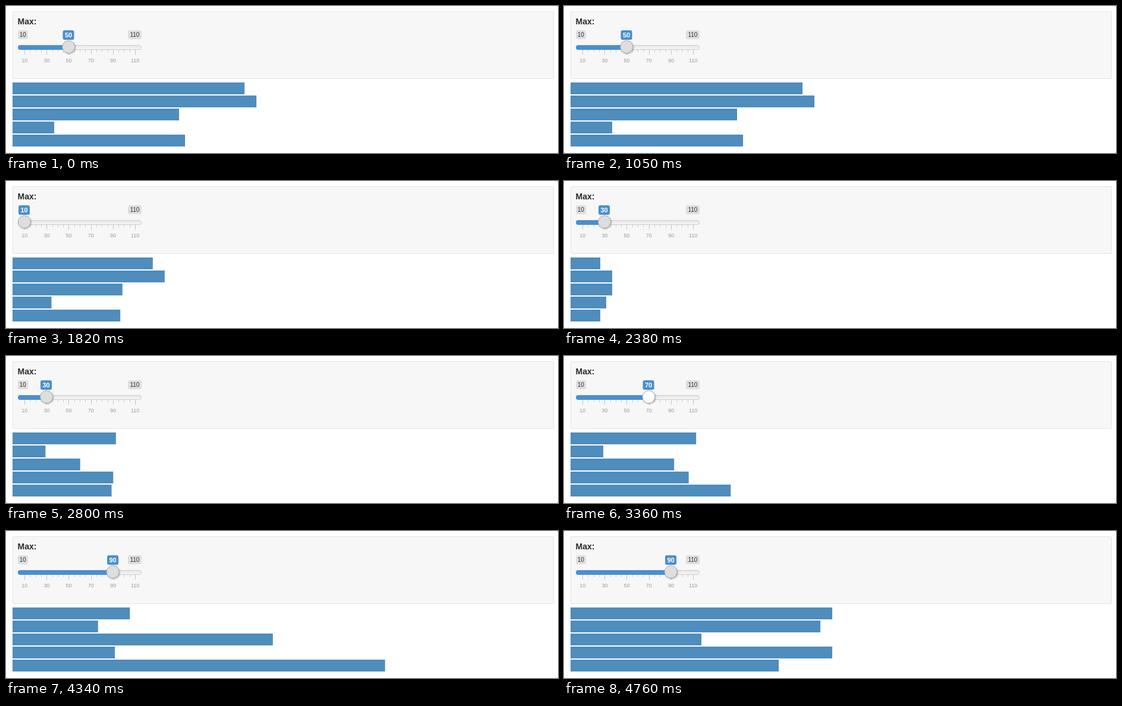
An HTML page for the animation above (5.25 s loop, 928 px wide and 248 px high).

```html
<!DOCTYPE html>
<html lang="en">
<head>
<meta charset="utf-8">
<title>Slider and bars</title>
<style>
  html, body { margin: 0; width: 100%; height: 100%; overflow: hidden; background: #aaa; }
  svg { display: block; width: 928px; height: 248px; font-family: "Liberation Sans", Arial, sans-serif; }
  .mid { text-anchor: middle; }
</style>
</head>
<body>
<svg id="stage" viewBox="0 0 928 248">
  <defs>
    <linearGradient id="groove" x1="0" y1="-0.5" x2="0" y2="1.5">
      <stop offset="0" stop-color="#dedede"/>
      <stop offset="1" stop-color="#fff"/>
    </linearGradient>
    <filter id="shadow" x="-30%" y="-30%" width="160%" height="160%">
      <feDropShadow dx="1" dy="1" stdDeviation="1.3" flood-opacity="0.3"/>
    </filter>
  </defs>
  <rect width="928" height="248" rx="2" fill="#fff"/>
  <rect x="11.5" y="9.5" width="909" height="113" rx="1.5" fill="#f7f7f7" stroke="#e3e3e3"/>
  <text x="19.6" y="31" font-size="14" font-weight="bold" fill="#2b2b2b">Max:</text>
  <g id="grid"></g>
  <rect x="20.5" y="66.5" width="207" height="7" rx="3.5" fill="url(#groove)" stroke="#ccc"/>
  <path id="fill" fill="#4a8fcf"/>
  <g font-size="10" fill="#333" class="mid">
    <g id="min"><rect x="20" y="41" width="17" height="15" rx="3" fill="#dfdfdf"/><text x="28.3" y="52">10</text></g>
    <rect x="205" y="41" width="23" height="15" rx="3" fill="#dfdfdf"/><text x="216.4" y="52">110</text>
  </g>
  <g id="bubble" class="mid">
    <rect x="-9.5" y="41" width="19" height="16" rx="3" fill="#4a8fcc"/>
    <text id="value" y="53" font-size="11" font-weight="bold" fill="#fff"></text>
  </g>
  <circle id="handle" cy="69" r="10.5" stroke="#aaa" filter="url(#shadow)"/>
  <g id="bars" fill="#4f8dbd"></g>
</svg>
<script>
const LOOP = 5250, STEP = 70, EASE_MS = 250;
const $ = id => document.getElementById(id);

// [time, slider value]
const moves = [[0, 50], [1470, 10], [2380, 30], [3010, 70], [3990, 90]];
// spans where the handle is highlighted
const hovers = [[1470, 1680], [2450, 2520], [3080, 3500], [3990, 4060]];
// [transition start, bar values]
const data = [
  [-EASE_MS, [39, 41, 28, 7, 29]],
  [1699, [5, 7, 7, 6, 5]],
  [2652, [22, 5, 13, 21, 21]],
  [3281, [15, 9, 48, 12, 68]],
  [4254, [44, 42, 22, 44, 35]]
];

const xOf = v => 31 + (v - 10) * 1.86;
const cubic = p => p < 0.5 ? 4 * p ** 3 : 1 - 4 * (1 - p) ** 3;
const clamp = p => Math.min(1, Math.max(0, p));

function add(parent, tag, attrs, text = "") {
  const el = document.createElementNS("http://www.w3.org/2000/svg", tag);
  for (const k in attrs) el.setAttribute(k, attrs[k]);
  el.textContent = text;
  return parent.appendChild(el);
}

for (let v = 10; v <= 110; v += 5) {
  const big = v % 20 === 10, x = Math.round(xOf(v));
  add($("grid"), "rect", { x, y: 74, width: 1, height: big ? 8 : 4, fill: big ? "#c2c4c6" : "#cccecf" });
  if (big) add($("grid"), "text", { x: xOf(v) + 0.2, y: 95, "font-size": 9, fill: "#999", class: "mid" }, v);
}
$("min").parentNode.setAttribute("text-anchor", "middle");

const bars = data[0][1].map((_, i) => add($("bars"), "rect", { x: 11, y: 129 + 22 * i, height: 20 }));

function draw(t) {
  const value = moves.filter(m => m[0] <= t).pop()[1];
  const x = xOf(value);
  $("fill").setAttribute("d", `M${x} 66H24a4 4 0 0 0 0 8H${x}z`);
  $("handle").setAttribute("cx", x - 0.2);
  $("handle").setAttribute("fill", hovers.some(([a, b]) => t >= a && t < b) ? "#fff" : "#dedede");
  $("bubble").setAttribute("transform", `translate(${Math.round(x * 2 - 1) / 2})`);
  $("value").textContent = value;
  $("min").setAttribute("visibility", value === 10 ? "hidden" : "visible");

  const n = data.filter(d => d[0] <= t).length - 1;
  const [start, to] = data[n], from = data[Math.max(0, n - 1)][1];
  const p = cubic(clamp((t - start) / EASE_MS));
  bars.forEach((bar, i) => bar.setAttribute("width", 10 * (from[i] + (to[i] - from[i]) * p)));
}

function tick() {
  const t = performance.now() % LOOP;
  draw(Math.floor(t / STEP) * STEP);
  requestAnimationFrame(tick);
}
tick();
</script>
</body>
</html>
```
